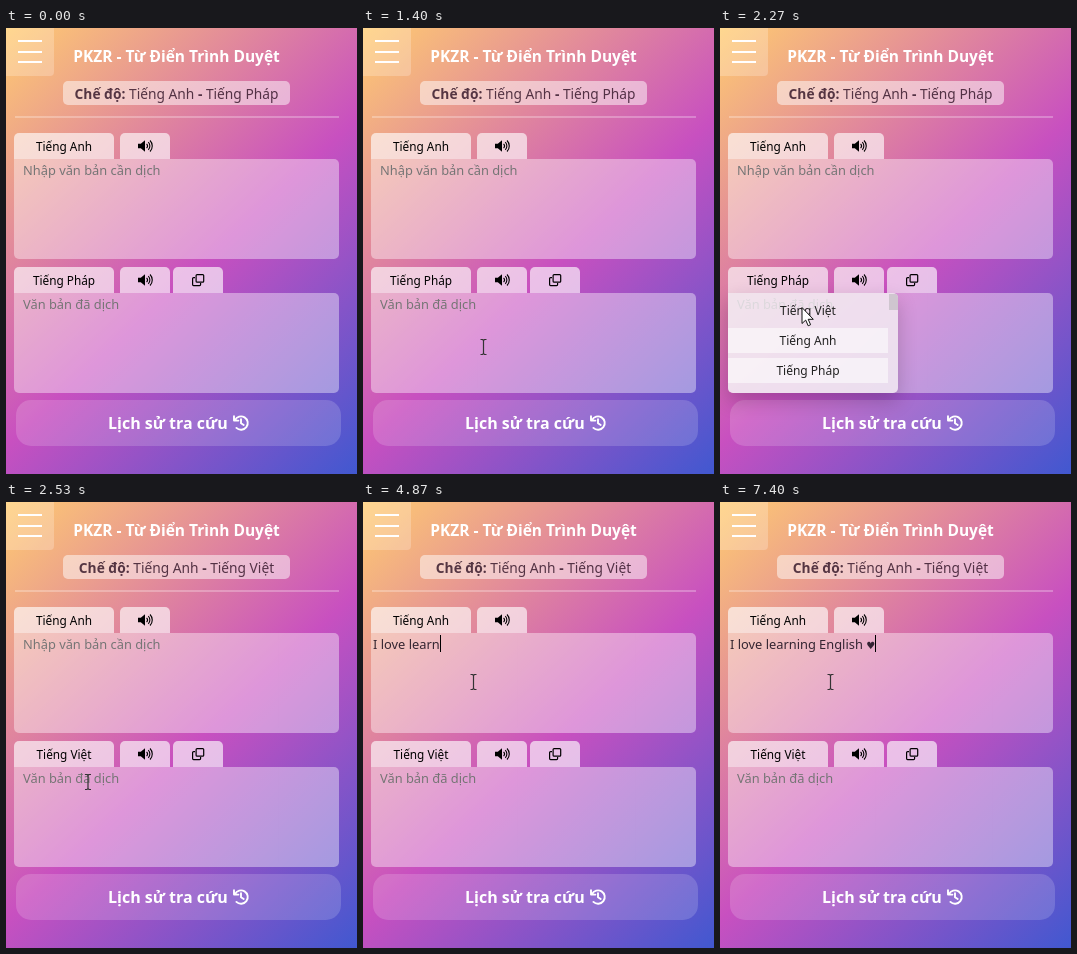
Animation, 351 px wide and 446 px high, one loop 8000 ms. Source, as an HTML page:

```html
<!DOCTYPE html>
<html lang="vi">
<head>
<meta charset="utf-8">
<title>Từ Điển Trình Duyệt</title>
<style>
  html, body { margin: 0; width: 100%; height: 100%; overflow: hidden; }
  body {
    position: relative;
    font: 12.85px "Noto Sans", "Open Sans", sans-serif;
    white-space: pre;
  }
  #stage {
    position: absolute; left: 0; top: 0; width: 351px; height: 446px; overflow: hidden;
    background: linear-gradient(-43deg, #4158d0 0%, #c850c0 46%, #ffcc70 100%);
  }
  #stage div, #stage svg { position: absolute; }
  .center { display: flex; align-items: center; justify-content: center; }
  .menu { left: 0; top: 0; width: 48px; height: 48px; background: rgba(255,255,255,.22); border-radius: 0 0 4px 0; }
  .menu div { left: 12px; width: 24px; height: 2px; background: #fff; }
  .title { left: 0; width: 341px; top: 14px; height: 27px; color: #fff; font-weight: 700; font-size: 15.5px; }
  .mode {
    left: 57px; top: 53px; width: 227px; height: 24px; border-radius: 5px;
    background: rgba(255,255,255,.5); color: rgba(40,10,30,.78); font-size: 13.75px;
  }
  .rule { left: 9px; top: 88px; width: 324px; height: 2px; background: rgba(255,255,255,.27); }
  .tab {
    height: 26px; width: 50px; border-radius: 5px 5px 0 0;
    background: rgba(255,255,255,.64); color: #000; font-size: 11.8px; font-weight: 500;
  }
  .tab svg { left: 0; top: 0; }
  .tab.wide { left: 8px; width: 100px; }
  .tab.hover { background: rgba(255,255,255,.37); }
  .upper { top: 105px; }
  .lower { top: 239px; }
  .area { left: 8px; width: 325px; height: 100px; border-radius: 0 5px 5px 5px; background: rgba(255,255,255,.4); }
  .line { left: 2px; top: 2px; height: 17px; line-height: 18px; color: rgba(20,10,25,.85); }
  .hint { left: 9px; color: #757575; font-weight: 500; }
  .heart { font: 10px/1 "DejaVu Sans", sans-serif; }
  .caret { display: inline-block; width: 1px; height: 17px; margin-right: -1px; background: #000; vertical-align: top; }
  .popup {
    left: 8px; top: 265px; width: 170px; height: 100px; overflow: hidden; border-radius: 0 5px 5px 5px;
    background: rgba(243,238,243,.82); box-shadow: 0 8px 20px rgba(0,0,0,.2);
  }
  .item { left: 0; width: 160px; height: 25px; background: rgba(255,255,255,.55); color: #222; font-size: 12px; font-weight: 300; }
  .item.hover { background: transparent; }
  .thumb { right: 0; top: 1px; width: 9px; height: 16px; background: #cfc6cf; }
  .history {
    left: 10px; top: 372px; width: 325px; height: 46px; border-radius: 15px;
    background: rgba(255,255,255,.16); color: #fff; font-weight: 700; font-size: 16px; line-height: 46px;
  }
  .history span { position: absolute; left: 92px; }
  #mouse { left: 0; top: 0; overflow: visible; }
</style>
</head>
<body>
<div id="stage">
  <div class="menu"><div style="top:12px"></div><div style="top:22.5px"></div><div style="top:33px"></div></div>
  <div class="title center">PKZR - Từ Điển Trình Duyệt</div>
  <div class="mode center"><span><b>Chế độ:</b> Tiếng Anh <b>-</b> <span class="target"></span></span></div>
  <div class="rule"></div>

  <div class="tab wide upper center">Tiếng Anh</div>
  <div class="tab upper" style="left:114px"><svg width="50" height="26"><use href="#speaker"/></svg></div>
  <div class="area" style="top:131px">
    <div class="line hint" id="hint">Nhập văn bản cần dịch</div>
    <div class="line"><span id="typed"></span><span class="heart" id="heart">♥</span><span class="caret" id="caret"></span></div>
  </div>

  <div class="tab wide lower center" id="targetTab"><span class="target"></span></div>
  <div class="tab lower" style="left:114px"><svg width="50" height="26"><use href="#speaker"/></svg></div>
  <div class="tab lower" style="left:167px">
    <svg width="50" height="26" fill="none" stroke="#000" stroke-width="1.2">
      <rect x="23.1" y="7.6" width="7.6" height="7.6" rx="1"/>
      <path d="M22 10.6H20.6a1 1 0 0 0-1 1V17.6a1 1 0 0 0 1 1H26.6a1 1 0 0 0 1-1V16"/>
    </svg>
  </div>
  <div class="area" style="top:265px"><div class="line hint">Văn bản đã dịch</div></div>

  <div class="history"><span>Lịch sử tra cứu</span>
    <svg style="left:216px;top:14px" width="18" height="18" fill="none" stroke="#fff" stroke-width="1.9" stroke-linecap="round" stroke-linejoin="round">
      <path d="M3 6.2A6.7 6.7 0 1 1 4.4 13.9M2 2.2V6.6H6.4M9 5.3V9.2L11.7 11"/>
    </svg>
  </div>

  <div class="popup" id="popup">
    <div class="item center" id="firstItem" style="top:5px">Tiếng Việt</div>
    <div class="item center" style="top:35px">Tiếng Anh</div>
    <div class="item center" style="top:65px">Tiếng Pháp</div>
    <div class="thumb"></div>
  </div>

  <svg id="mouse" width="351" height="446">
    <defs>
      <g id="speaker">
        <path d="M18 10.8h2.8L25 7.2V18.8L20.8 15.2H18z"/>
        <path d="M26.6 10.9a3 3 0 0 1 0 4.2M28.3 9.2a5.4 5.4 0 0 1 0 7.6M30 7.5a7.8 7.8 0 0 1 0 11" fill="none" stroke="#000" stroke-width="1.1"/>
      </g>
      <path id="beam" d="M-3-7.5H-1L0-6.5 1-7.5H3M0-6.5V6.5M-3 7.5H-1L0 6.5 1 7.5H3" fill="none" stroke="#333" stroke-width="1.2"/>
      <path id="arrow" d="M0 0V16L3.7 12.6 6.2 18.3 8.6 17.2 6.2 11.8H11.3Z" fill="#fff" stroke="#111"/>
      <path id="hand" d="M-1.5 1.5Q0-1 1.5 1.5V8Q3.3 6.6 4.6 8.4 6.4 7.4 7.6 9.3 10.4 8.6 10.4 11.5V15Q10.4 17.5 8.6 20V22.5H0V20.5Q-2.5 17.5-5 13.6-5.8 11.4-3.8 11.4L-1.5 13.4ZM1.5 8v4M4.6 8.6v3.6M7.6 9.4v3" fill="#fff" stroke="#111" stroke-width="1.1" stroke-linejoin="round"/>
    </defs>
    <use id="pointer"/>
  </svg>
</div>

<script>
  const LOOP = 8000;
  const SENTENCE = 'I love learning English ';
  const HEART_AT = 7400;
  const keyTimes = [
    3670, 3870, 3930, 4130, 4200, 4270, 4330, 4470, 4530, 4670, 4730, 4870,
    5130, 5270, 5330, 5470, 5600, 5730, 5870, 6000, 6200, 6400, 6470, 6670
  ];
  // time, x, y, shape
  const pointerPath = [
    [1270, 340, 428, 'arrow'], [1330, 230, 375, 'hand'], [1400, 120.5, 319, 'beam'],
    [1470, 107, 301, 'beam'], [1530, 96, 286, 'beam'], [1600, 87, 274, 'beam'],
    [1670, 80, 262, 'hand'], [1730, 76, 256, 'hand'], [1800, 74, 253.5, 'hand'],
    [2070, 76, 259, 'hand'], [2130, 78, 267, 'arrow'], [2200, 80, 274, 'arrow'],
    [2270, 82, 279.5, 'arrow'], [2530, 82, 280, 'beam'], [2730, 86, 269, 'beam'],
    [2800, 95, 235, 'arrow'], [2870, 106, 195, 'beam'], [2930, 110.5, 180, 'beam']
  ];
  const byId = id => document.getElementById(id);
  const between = (t, from, to) => t >= from && t < to;
  const show = (id, on) => { byId(id).style.visibility = on ? 'visible' : 'hidden'; };

  function render(t) {
    const language = t < 2530 ? 'Tiếng Pháp' : 'Tiếng Việt';
    document.querySelectorAll('.target').forEach(el => { el.textContent = language; });

    const step = pointerPath.filter(p => p[0] <= t).pop();
    show('pointer', step);
    if (step) {
      const [, x, y, shape] = step;
      byId('pointer').setAttribute('href', '#' + shape);
      byId('pointer').setAttribute('transform', `translate(${x} ${y})`);
    }

    show('popup', between(t, 1670, 2530));
    byId('targetTab').classList.toggle('hover', between(t, 1670, 2130));
    byId('firstItem').classList.toggle('hover', between(t, 2200, 2530));

    const count = keyTimes.filter(k => k <= t).length;
    byId('typed').textContent = SENTENCE.slice(0, count);
    show('hint', !count);
    byId('heart').style.display = t >= HEART_AT ? 'inline' : 'none';
    show('caret', t >= 2930 && !between(t, 3470, 3670) && !between(t, 7200, HEART_AT));
  }

  const start = performance.now();
  function tick() {
    render((performance.now() - start) % LOOP);
    requestAnimationFrame(tick);
  }
  tick();
</script>
</body>
</html>
```
